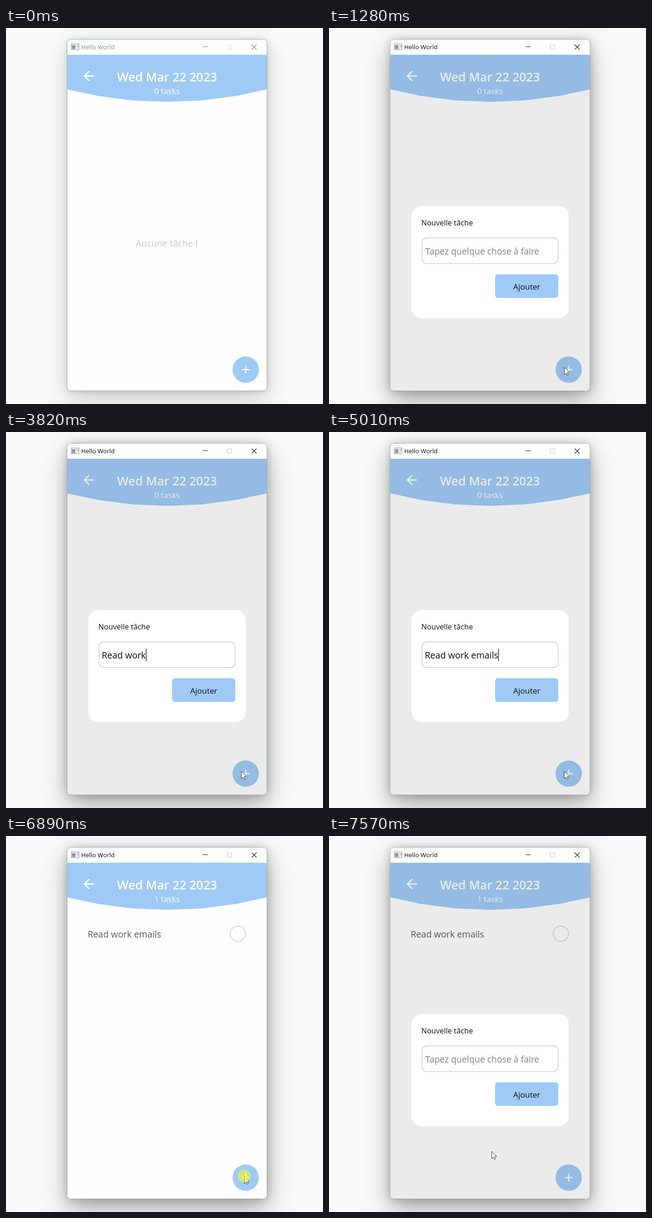
These frames come from a looping animation (687 by 815 pixels, 8000 ms). An HTML page:

```html
<!DOCTYPE html>
<html lang="fr">
<head>
<meta charset="utf-8">
<title>Hello World</title>
<style>
  html, body { margin: 0; width: 100%; height: 100%; overflow: hidden; background: #f8faf9; }
  .shadow, svg { position: absolute; left: 0; top: 0; }
  .shadow { left: 133px; top: 24px; width: 433px; height: 762px; border-radius: 8px; }
  #idle { box-shadow: 0 16px 46px rgba(0,0,0,.19), 0 2px 12px rgba(0,0,0,.13); }
  #focus { box-shadow: 0 24px 56px rgba(0,0,0,.3), 0 2px 21px rgba(0,0,0,.22); }
  svg { width: 687px; height: 815px; }
  text { font-family: "Open Sans", "Noto Sans", sans-serif; white-space: pre; }
  .mid { text-anchor: middle; }
  .line { fill: none; stroke-width: 1.1; }
</style>
</head>
<body>
<div class="shadow" id="idle"></div>
<div class="shadow" id="focus"></div>
<svg viewBox="0 0 687 815">
  <rect x="132.5" y="24.5" width="433" height="762" rx="8" fill="#fefefe" stroke="#a9abab"/>

  <g id="bar">
    <rect x="141.5" y="34.5" width="16.5" height="12.5" fill="#f6f8f9" stroke="#8b9298"/>
    <rect x="143" y="37" width="7" height="8.5" fill="#8a97a2"/>
    <path d="M152 37V45.5" stroke="#cfd5da" stroke-width="2"/>
    <path d="M156 36.5V42" stroke="#8a97a2" stroke-width="1.5"/>
    <text id="title" x="163" y="46" font-size="13.3">Hello World</text>
    <g id="controls" class="line">
      <path d="M426 40.5H437M532.5 36L543 46.5M543 36L532.5 46.5"/>
    </g>
    <rect id="max" class="line" x="479.5" y="36.5" width="9.5" height="9.5" rx="1"/>
  </g>

  <path d="M133 58H565V133L500 147 424 157 349 160 274 157 198 147 133 133Z" fill="#9fcaf6"/>
  <path transform="translate(162.4 87.2) scale(1.4)" fill="#fff"
    d="M20 11H7.83l5.59-5.59L12 4l-8 8 8 8 1.41-1.41L7.83 13H20z"/>
  <text class="mid" x="349" y="116" font-size="26.2" font-weight="600" fill="#fff">Wed Mar 22 2023</text>
  <text id="count" class="mid" x="349" y="142.7" font-size="17.2" fill="#fff"></text>
  <text id="empty" class="mid" x="348.3" y="474" font-size="19.6" fill="#c8cacb">Aucune tâche !</text>

  <g id="item">
    <text id="task" x="177" y="220" font-size="19.4" fill="#5c5c5c">Read work emails</text>
    <circle cx="502.5" cy="211.8" r="16.6" class="line" stroke="#cacaca" style="stroke-width:1.4"/>
  </g>

  <circle cx="519.5" cy="740.5" r="28.5" fill="#9fcaf6"/>
  <path d="M511 740.5H528M519.5 732V749" stroke="#fff" stroke-width="2.3"/>

  <g id="dialog">
    <path d="M133 58H565V778a8 8 0 0 1-8 8H141a8 8 0 0 1-8-8Z" fill="#000" fill-opacity=".075"/>
    <rect x="178.5" y="386" width="341" height="243" rx="22" fill="#fff"/>
    <text x="200" y="427.5" font-size="16.2" fill="#111">Nouvelle tâche</text>
    <rect x="201.5" y="455" width="295" height="55.7" rx="10" fill="#fff" stroke="#c6c6c6" stroke-width="1.3"/>
    <text id="hint" x="208.7" y="491" font-size="19.15" fill="#828282">Tapez quelque chose à faire</text>
    <text id="typed" x="207.6" y="491" font-size="19.4" fill="#0c0c0c"></text>
    <rect id="caret" y="469.5" width="1.2" height="27" fill="#000"/>
    <rect x="360" y="534" width="137" height="51" rx="6" fill="#9fcaf6"/>
    <text class="mid" x="428.7" y="567" font-size="17.2" fill="#111">Ajouter</text>
  </g>

  <circle id="cover" cx="510" cy="735" r="14" fill="#9fcaf6"/>
  <g id="pointer">
    <path d="M0 .5V16.3L3.7 12.9 6.1 17.8 8.6 16.7 6.2 11.9H11.2Z" fill="#fff" stroke="#222" stroke-width=".9"/>
    <circle id="ring" r="14" fill="#ff0" fill-opacity=".5"/>
  </g>
</svg>
<script>
const LOOP = 8000, TEXT = "Read work emails", FIELD_X = 207.6;
// when each letter is typed
const KEYS = [1940, 2140, 2340, 2470, 2670, 3290, 3490, 3620, 3820, 4080, 4350, 4480, 4610, 4740, 4810, 5010];
// pointer moves: start, end, from, to
const MOVES = [
  [440, 1070, [603, 806], [510, 735]],
  [6290, 6480, [510, 735], [516.5, 737]],
  [7300, 7570, [516.5, 737], [352.5, 683]]
];

const el = {};
document.querySelectorAll("[id]").forEach(e => el[e.id] = e);
const show = (e, on) => e.setAttribute("visibility", on ? "visible" : "hidden");
const within = (t, a, b) => t >= a && t < b;
const ramp = (t, a, b) => Math.min(1, Math.max(0, (t - a) / (b - a)));
const smooth = p => p * p * (3 - 2 * p);
const mix = (a, b, p) => a + (b - a) * p;
const rgb = (from, to, p) => `rgb(${from.map((c, i) => Math.round(mix(c, to[i], p)))})`;

function pointerAt(t) {
  const move = MOVES.filter(m => t >= m[0]).pop() || MOVES[0];
  const p = smooth(ramp(t, move[0], move[1]));
  return move[2].map((c, i) => mix(c, move[3][i], p));
}

function drawWindow(t) {
  const active = ramp(t, 1040, 1200);
  el.idle.style.opacity = 1 - active;
  el.focus.style.opacity = active;
  el.title.setAttribute("fill", rgb([126, 143, 158], [16, 16, 20], active));
  el.controls.setAttribute("stroke", rgb([125, 125, 128], [24, 20, 36], active));
  el.max.setAttribute("stroke", rgb([222, 222, 222], [200, 200, 200], active));
}

function drawTasks(t) {
  const added = t >= 5540;
  el.count.textContent = added ? "1 tasks" : "0 tasks";
  show(el.empty, !added);
  el.item.style.opacity = ramp(t, 5620, 5880);
}

function drawDialog(t) {
  const first = within(t, 1280, 5540), again = t >= 6960;
  const n = first ? KEYS.filter(k => t >= k).length : 0;
  el.dialog.style.display = first || again ? "" : "none";
  el.typed.textContent = TEXT.slice(0, n);
  el.hint.style.display = n ? "none" : "";
  const width = n ? el.task.getSubStringLength(0, n) : 1;
  el.caret.setAttribute("x", FIELD_X + width);
  const lit = again ? t < 7490 : n > 0 && !within(t, 3220, 3290);
  el.caret.style.display = lit ? "" : "none";
}

function drawPointer(t) {
  const [x, y] = pointerAt(t);
  const press = within(t, 1080, 1280);
  show(el.pointer, t >= 460);
  el.pointer.setAttribute("transform", `translate(${x} ${y})`);
  show(el.cover, press);
  show(el.ring, press || within(t, 6890, 6960));
}

function frame() {
  const t = performance.now() % LOOP;
  drawWindow(t);
  drawTasks(t);
  drawDialog(t);
  drawPointer(t);
  requestAnimationFrame(frame);
}
frame();
</script>
</body>
</html>
```
